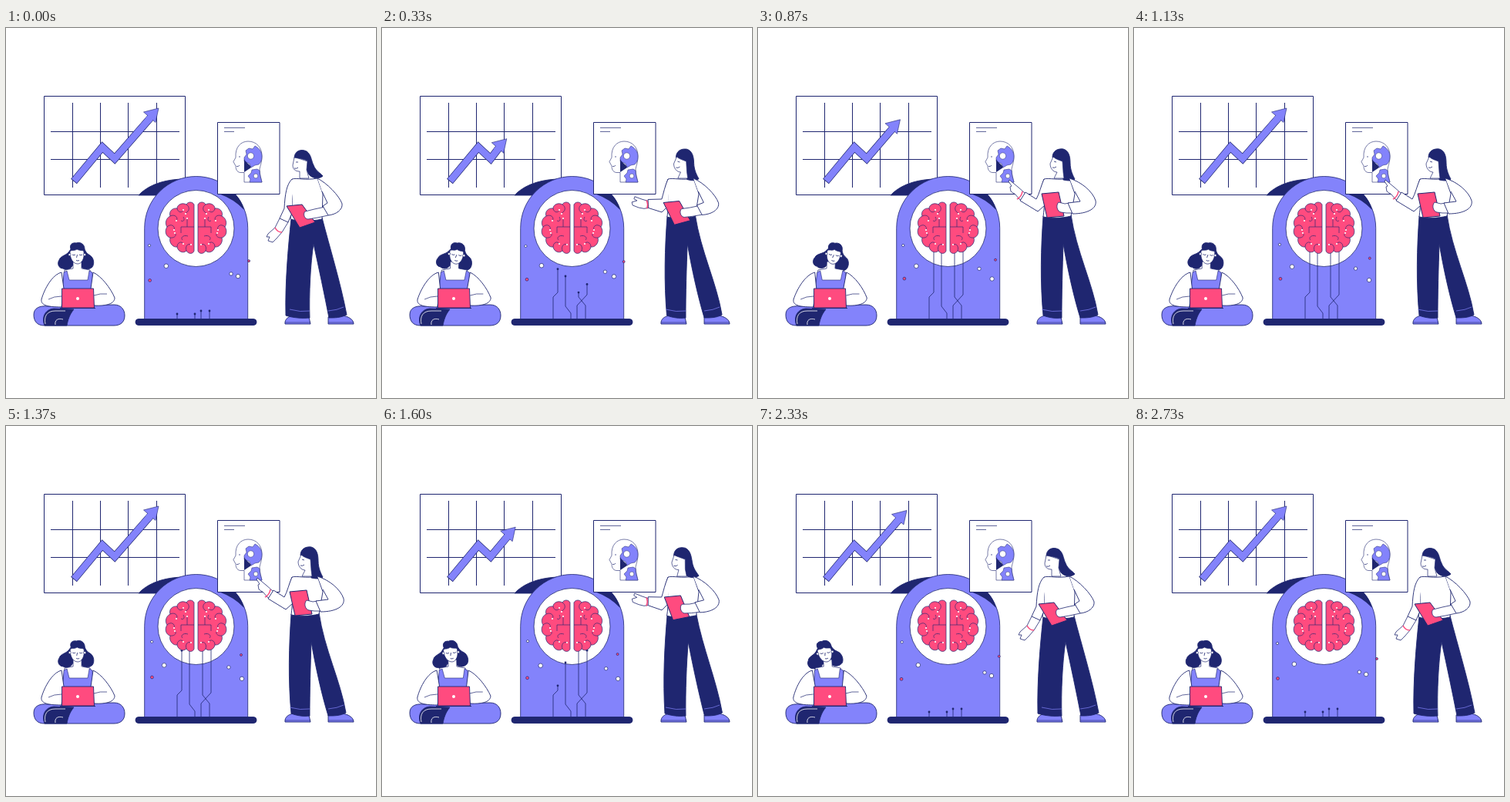
These frames come from a looping animation (480x480 px, 2.77 s). An HTML page with a canvas:

```html
<!DOCTYPE html>
<html lang="en">
<head>
<meta charset="utf-8">
<style>
html, body { margin: 0; width: 100%; height: 100%; overflow: hidden; background: #fff; }
canvas { display: block; width: 480px; height: 480px; }
</style>
</head>
<body>
<canvas id="stage" width="480" height="480"></canvas>
<script>
const ctx = document.getElementById('stage').getContext('2d');
const LOOP = 2770, TAU = Math.PI * 2;
const NAVY = '#1f2670', VIOLET = '#8383fb', PINK = '#ff4b7f', WHITE = '#fff';

// Eased 0 to 1 between times a and b
const ramp = (t, a, b) => {
  const x = Math.min(1, Math.max(0, (t - a) / (b - a)));
  return (1 - Math.cos(Math.PI * x)) / 2;
};

function shape(d, fill, stroke = NAVY, width = 0.9) {
  const p = new Path2D(d);
  if (fill) { ctx.fillStyle = fill; ctx.fill(p); }
  if (stroke) { ctx.strokeStyle = stroke; ctx.lineWidth = width; ctx.stroke(p); }
}

function dot(x, y, r, fill, stroke = NAVY, width = 0.8) {
  ctx.beginPath();
  ctx.arc(x, y, r, 0, TAU);
  if (fill) { ctx.fillStyle = fill; ctx.fill(); }
  if (stroke) { ctx.strokeStyle = stroke; ctx.lineWidth = width; ctx.stroke(); }
}

// Blend path strings that share the same commands; k runs over the poses
function mix(poses, k) {
  const i = Math.min(Math.floor(k), poses.length - 2), f = k - i;
  const to = poses[i + 1].match(/[\d.]+/g);
  let n = 0;
  return poses[i].replace(/[\d.]+/g, v => +v + (to[n++] - v) * f);
}

function chart(t) {
  shape('M49.5 88.5H232.5V216.5H49.5Z', WHITE, NAVY, 1);
  shape('M86.5 97V207M122.5 97V207M158.5 97V207M195.5 97V207M58 134.5H225M58 170.5H225', null, NAVY, 1);
  const phase = t % (LOOP / 2);
  const p = ramp(phase, 0, 350) - ramp(phase, 620, 1050);
  const x = 198 - 36.5 * p, y = 104 + 40 * p;
  const shaft = `L125 154.5L141 169.5L${x - 10} ${y + 11.7}`;
  shape('M88 199' + shaft, null, NAVY, 10);
  shape('M88.5 198.4' + shaft, null, VIOLET, 8.7);
  shape(`M${x} ${y}L${x - 19.5} ${y + 5}L${x - 4} ${y + 18.5}Z`, VIOLET, NAVY, 0.6);
  shape(`M${x - 14} ${y + 16.2}L${x - 9} ${y + 10.5}`, null, VIOLET, 8.6);
}

const WIRES = [
  { pts: [[222, 377], [222, 349], [228, 343], [228, 285]], stub: 6, up: 20, down: 1268 },
  { pts: [[245, 377], [245, 370], [238, 361], [238, 285]], stub: 6, up: 55, down: 1402 },
  { pts: [[253, 377], [253, 360], [266, 346], [266, 285]], stub: 10, up: 95, down: 1498 },
  { pts: [[264, 377], [264, 360], [255, 349], [255, 285]], stub: 10, up: 140, down: 1558 }
];

function wire({ pts, stub, up, down }, t) {
  const k = ramp(t, up, up + 500) - ramp(t, down, down + 600);
  const lens = pts.slice(1).map((p, i) => Math.hypot(p[0] - pts[i][0], p[1] - pts[i][1]));
  let left = stub + (lens[0] + lens[1] + lens[2] - stub) * k;
  let [x, y] = pts[0], d = `M${x} ${y}`;
  for (let i = 0; i < 3 && left > 0; i++) {
    const f = Math.min(1, left / lens[i]);
    x = pts[i][0] + (pts[i + 1][0] - pts[i][0]) * f;
    y = pts[i][1] + (pts[i + 1][1] - pts[i][1]) * f;
    d += `L${x} ${y}`;
    left -= lens[i];
  }
  shape(d, null, NAVY, 0.8);
  dot(x, y, 1.4, NAVY, null);
}

function brainHalf() {
  shape('M244 229C242 225 236 225 234 229C229 226 222 229 222 234C215 233 211 239 213 244C207 247 206 254 209 258C205 264 208 271 213 272C211 279 217 285 222 284C223 290 230 293 234 289C237 294 243 293 244 289Z', PINK, NAVY, 0.7);
  shape('M244 258H227V266M235 258V247M222 234C223 240 229 240 230 236M213 244C219 241 224 246 221 250M209 258C214 253 220 257 218 262M213 272C219 273 222 268 219 266M222 284C222 278 228 276 230 280M234 289C232 283 236 279 240 281M234 229C239 232 238 238 233 240M227 250C231 252 232 248 230 245M236 270C230 268 226 272 229 275', null, NAVY, 0.65);
  for (const [x, y] of [[230, 236], [221, 250], [233, 241], [218, 262], [219, 266], [230, 280], [240, 281], [235, 247]])
    dot(x, y, 1.1, WHITE, null);
}

// Floating dots: centre, swing and peak time on each axis, radius, colour
const FLOATS = [
  [187.6, 1.6, .5, 281, 2, .15, 1.6, WHITE],
  [206.5, 1.5, .92, 309.6, 1.4, .65, 2.8, WHITE],
  [188, 2, .37, 326.7, 1.6, .82, 1.9, PINK],
  [290.5, 3.5, .82, 316, 4, .88, 2.2, WHITE],
  [303.5, 2.7, .56, 325, 3, .54, 2.7, WHITE],
  [310, 5, 0, 299.5, 3.6, .12, 1.5, PINK]
];

function machine(t) {
  shape('M172 217C184 204 205 196 232 196V217Z', NAVY);
  shape('M179.7 378V259.5A67 67 0 0 1 313.7 259.5V378Z', VIOLET, NAVY, 0.8);
  shape('M276 215H297Q306 224 309 236Q296 222 276 215Z', NAVY, null);
  dot(246.5, 260, 49.5, WHITE);
  WIRES.forEach(w => wire(w, t));
  brainHalf();
  ctx.save();
  ctx.transform(-1, 0, 0, 1, 493, 0);
  brainHalf();
  ctx.restore();
  const swing = (c, a, peak) => c + a * Math.cos(TAU * (t / LOOP - peak));
  for (const [cx, ax, px, cy, ay, py, r, fill] of FLOATS)
    dot(swing(cx, ax, px), swing(cy, ay, py), r, fill, NAVY, 0.7);
  shape('M172 377.5H321A4 4 0 0 1 321 385.5H172A4 4 0 0 1 172 377.5Z', NAVY);
}

function poster() {
  shape('M274.5 122.5H355V215.5H274.5Z', WHITE, NAVY, 1);
  shape('M283 129.5H310M283 134.5H296', null, NAVY, 0.7);
  shape('M309 200V187.5L304 187.5C299 187 298 182 298 179L295 173.5L298 168C297 154 305 147 314 147C325 147 332 155 332 166C332 174 330 178 329 183C329 190 331 195 332 200Z', WHITE, NAVY, 0.6);
  shape('M309 168L312 164L311 159L315 156L320 157L323 153C329 156 332 161 332 167C332 172 330 175 328 177L323 178L318 181L316 176L309 173Z', VIOLET, NAVY, 0.5);
  shape('M309 170C311 175 317 177 318 181L309 187Z', NAVY, null);
  dot(317.5, 166, 4.2, WHITE, NAVY, 0.5);
  shape('M316 200L317 196L314 192L318 188L319 184L326 183L329 185C329 191 331 196 332 200Z', VIOLET, NAVY, 0.5);
  dot(324, 192, 2.9, WHITE, NAVY, 0.5);
  shape('M302 167H304M299 179.5Q302 180 303 178', null, NAVY, 0.7);
}

function sitter(t) {
  const s = Math.sin(TAU * t / LOOP);
  shape('M36 372C36 363 44 360 54 361L140 359C150 359 154 366 154 373C154 382 148 386 140 386H50C40 386 36 380 36 372Z', VIOLET);
  shape('M50 386C46 376 50 365 62 364L88 365C82 372 80 380 79 386Z', NAVY);
  shape('M51 384C49 374 53 367 64 367H77M64 385C63 379 67 376 74 378', null, WHITE, 0.8);

  const tilt = () => {
    ctx.translate(92, 314);
    ctx.rotate(0.17 * s);
    ctx.translate(-92, -314);
  };
  ctx.save();
  ctx.transform(1, 0, -0.05 * s, 1, 0.05 * s * 355, 0);
  ctx.save();
  tilt();
  shape('M84 287C82 281 86 278 91 279C96 277 102 280 102 287C104 292 106 293 109 295C114 298 115 306 112 310C108 314 101 314 98 310L86 308C85 313 78 315 74 312C68 312 66 305 69 301C70 296 78 295 81 291Z', NAVY);
  ctx.restore();
  shape('M76 314L87 312V303H98V312L109 314L113 338H73Z', WHITE, NAVY, 0.7);
  shape('M75 317L79 315L82 327H106L108 315L112 317L114 362H72Z', VIOLET, NAVY, 0.6);
  shape('M72 317C60 320 50 338 46 352C45 359 52 362 72 362L75 338Z', WHITE);
  shape('M113 317C124 322 136 338 141 350C141 357 132 361 114 360L110 338Z', WHITE);
  shape('M72 348Q62 348 55 352M114 347Q122 344 131 345', null, NAVY, 0.7);
  tilt();
  shape('M83 291C83 287 88 290 92 287C97 290 101 287 101 291C102 299 98 306 93 306C87 306 83 299 83 291Z', WHITE, NAVY, 0.7);
  shape('M86 294Q88 295.5 90 294M95 294Q97 295.5 99 294M92.5 294L91.5 298M91 301.5Q93 302.5 95 301.5', null, NAVY, 0.8);
  dot(82.5, 294, 1.6, WHITE, NAVY, 0.6);
  dot(102, 294, 1.6, WHITE, NAVY, 0.6);
  ctx.restore();

  shape('M72.5 338H113.5L114.5 363H72.5Z', PINK);
  shape('M70 363.5H116', null, NAVY, 1.2);
  dot(93, 351, 2, WHITE, null);
}

const STAND = {
  pants: [
    'M370 247C382 251 398 250 410 246C420 285 434 330 442 372C434 376 427 376 419 376C413 345 406 312 399 280C395 305 393 345 394 376C384 377 372 376 363 373C362 330 366 285 370 247Z',
    'M370 244C382 246 394 246 406 242C413 290 434 330 441 372C434 376 426 376 418 376C410 350 402 315 396 280C395 310 394 345 394 376C386 377 378 376 370 373C366 330 367 285 370 244Z'],
  torso: [
    'M371 196C378 194 388 198 404 195L411 215L410 248C396 251 380 251 369 248C372 230 372 215 368 205Z',
    'M371 196C378 194 388 198 404 195L411 215L406 244C394 247 380 247 370 245C372 230 372 215 368 205Z'],
  hair: [
    'M374 169C374 160 382 156 390 160C396 164 396 172 399 178C402 186 408 188 411 192C407 196 398 196 393 190L390 184L391 172C385 170 380 168 374 169Z',
    'M382 168C382 160 388 156 396 157C403 159 405 166 405 175C405 185 409 192 411 196C407 199 401 198 396 197L396 187L395 173C390 171 386 170 382 168Z'],
  face: [
    'M374 168L372 178C372 183 375 186 381 186L381 195L393 195L390 184L391 173C385 171 380 169 374 168Z',
    'M383 167L379 176C379 182 383 187 388 187L384 195L397 195L396 187L395 173C390 171 386 170 383 167Z'],
  look: [
    'M376 174L379 174M374 182Q377 183 379 181',
    'M384 173L387 174M382 181Q385 182 387 180'],
  sleeve: [
    'M371 196C364 203 362 215 361 234L355 247L366 252L371 240',
    'M371 196C367 205 365 215 363 222L345 223L346 234L363 239L372 230',
    'M371 196C367 205 365 215 361 222L347 213L340 224L363 238L372 230'],
  hand: [
    'M355 247L349 259L340 267L338 271L342 271L340 276L346 278L351 273L358 265L366 252',
    'M345 225L337 223L328 220L327 223L331 225L324 227L325 231L333 234L340 235L346 234',
    'M346 214L337 206L326 197L325 199L329 205L327 206L328 212L334 216L339 222L341 223'],
  band: [
    'M349 259Q352 265 358 265',
    'M343 224Q346 229 344 235',
    'M343 212Q342 219 336 222'],
  board: [
    'M364 231L384 229L401 252L381 259Z',
    'M368 215L390 213L397 244L375 246Z'],
  grip: [
    'M414 232L400 235L388 238C385 241 387 248 392 248L404 246L418 243',
    'M404 227L398 228L390 226C386 230 388 238 393 239L400 240L408 240'],
  puff: [
    'M404 195C416 201 432 217 436 228C437 236 428 242 418 243L411 231L417 227L410 212',
    'M404 195C420 200 434 212 438 224C440 234 428 241 408 241L402 227L418 225L411 212']
};

function presenter(t) {
  const body = ramp(t, 0, 400) - ramp(t, 1400, 1840);
  const reach = 2 * (ramp(t, 0, 640) - ramp(t, 1390, 1850));
  const hold = ramp(t, 160, 640) - ramp(t, 1390, 1850);
  const part = (name, k, fill, stroke, width) => shape(mix(STAND[name], k), fill, stroke, width);

  shape('M362 384C361 377 368 373 375 373L393 375L395 384ZM418 384V375L436 373C444 374 451 378 451 384Z', VIOLET);
  shape('M362 382H395M418 382H451', null, NAVY, 0.6);
  part('pants', body, NAVY);
  shape('M368 365Q382 369 394 367M418 367Q430 366 438 362', null, VIOLET, 0.7);
  part('torso', body, WHITE);
  part('hair', body, NAVY);
  part('face', body, WHITE, NAVY, 0.7);
  part('look', body, null, NAVY, 0.8);
  part('hand', reach, WHITE, NAVY, 0.8);
  part('sleeve', reach, WHITE);
  part('band', reach, null, PINK, 1.6);
  part('board', hold, PINK, NAVY, 1);
  part('grip', hold, WHITE, NAVY, 0.8);
  part('puff', hold, WHITE);
}

function frame(now) {
  const t = now % LOOP;
  ctx.fillStyle = WHITE;
  ctx.fillRect(0, 0, 480, 480);
  chart(t);
  machine(t);
  poster();
  sitter(t);
  presenter(t);
  requestAnimationFrame(frame);
}
requestAnimationFrame(frame);
</script>
</body>
</html>
```
